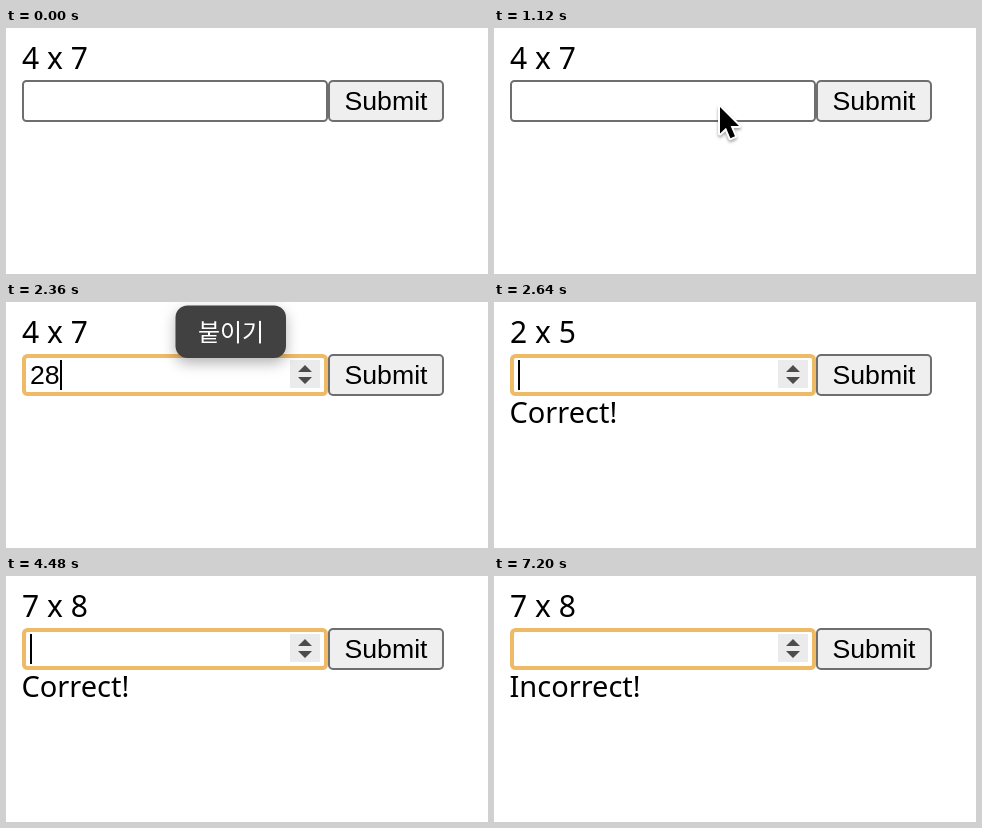
Recreate the animation shown at these times as an HTML page. Size 482 px wide and 246 px high, loop 7480 ms.

```html
<!DOCTYPE html>
<html lang="en">
<head>
<meta charset="utf-8">
<title>Times table quiz</title>
<style>
  html, body { margin: 0; width: 100%; height: 100%; overflow: hidden; background: #fff; }
  svg { display: block; width: 482px; height: 246px; }
  .prose { font-family: "Noto Sans", sans-serif; }
  .form { font: 26.67px "Liberation Sans", Arial, sans-serif; }
  .popup { font: 500 24px "Noto Sans CJK KR", "Noto Sans CJK", sans-serif; }
  #popup rect { filter: drop-shadow(0 5px 7px rgba(0, 0, 0, .3)); }
  #arrow { filter: drop-shadow(0 2px 1.5px rgba(0, 0, 0, .35)); }
</style>
</head>
<body>
<svg viewBox="0 0 482 246">
  <text id="question" class="prose" x="16" y="41" font-size="30"></text>

  <rect id="idle" x="17" y="53" width="304" height="40" rx="3.5" fill="#fff" stroke="#6e6e6e" stroke-width="2"/>
  <rect id="focus" x="18" y="54" width="302" height="38" rx="3.5" fill="#fff" stroke="#efba66" stroke-width="4"/>
  <g id="spinner">
    <path d="M284 58h30v28h-30z" fill="#ebebeb"/>
    <path d="M292 70l7-7 7 7zM292 75h14l-7 7z" fill="#4c4c4c"/>
  </g>
  <text id="answer" class="form" x="24" y="82"></text>
  <rect id="caret" y="58" width="2" height="30"/>

  <rect x="323" y="53" width="114" height="40" rx="4" fill="#efefef" stroke="#6e6e6e" stroke-width="2"/>
  <text class="form" x="380" y="82" text-anchor="middle">Submit</text>
  <text id="feedback" class="prose" x="15.5" y="121" font-size="29"></text>

  <g id="popup">
    <rect x="169.5" y="3.5" width="110.5" height="52.5" rx="12" fill="#414141"/>
    <text class="popup" x="225" y="39" text-anchor="middle" fill="#fff">붙이기</text>
  </g>

  <g id="pointer">
    <path id="arrow" d="M0 0v26.5l6-5.7 4.4 10.4 4.6-2-4.4-10.2h8.4z"
      stroke="#fff" stroke-width="4" paint-order="stroke" stroke-linejoin="round"/>
    <path id="beam" d="M-5-16q5 0 5 4v24q0 4-5 4M5-16q-5 0-5 4v24q0 4 5 4M-3 5h6"
      fill="none" stroke="#222" stroke-width="1.6"/>
  </g>
</svg>
<script>
const LOOP = 7480, TICK = 40;
const el = id => document.getElementById(id);
const show = (id, on) => el(id).style.opacity = +on;

// [time, value] steps, each held until the next
const questions = [[0, '4 x 7'], [2640, '2 x 5'], [4480, '7 x 8']];
const answers = [[0, ''], [2240, '2'], [2320, '28'], [2640, ''], [4120, '1'], [4200, '10'],
  [4480, ''], [5480, '5'], [5600, '54'], [5720, '']];
const feedbacks = [[0, ''], [2640, 'Correct!'], [5720, 'Incorrect!']];
const carets = [[0, 0], [1520, 1], [2040, 0], [2240, 1], [3120, 0], [3600, 1],
  [5000, 0], [5480, 1], [6200, 0], [6720, 1], [7200, 0]];
const pointers = [[0, ''], [680, 'arrow'], [1440, 'beam'], [2240, ''],
  [3120, 'beam'], [3200, 'arrow'], [4120, '']];

// [time, x, y] and [time, opacity], interpolated
const returnPath = [[3080, 226, 79], [3280, 257, 98], [3400, 249, 93.5], [3560, 249, 93.5], [3640, 250, 93]];
const popupFade = [[2240, 0], [2360, 1], [2520, 0]];

const held = (steps, t) => steps.filter(s => s[0] <= t).pop()[1];

function tween(keys, t) {
  const i = keys.findIndex(k => k[0] > t);
  if (i < 1) return keys.at(i).slice(1);
  const [a, b] = [keys[i - 1], keys[i]];
  const k = (t - a[0]) / (b[0] - a[0]);
  return a.slice(1).map((v, n) => v + (b[n + 1] - v) * k);
}

function pointerAt(t) {
  if (t >= 3080) return tween(returnPath, t);
  const k = Math.min(1, Math.max(0, (t - 640) / 480));
  const left = (1 - k) ** 2;
  return [226 + 256 * left, 79 + 36 * left];
}

function draw(t) {
  const answer = held(answers, t);
  el('question').textContent = held(questions, t);
  el('answer').textContent = answer;
  el('feedback').textContent = held(feedbacks, t);

  el('caret').setAttribute('x', 24 + Math.round(answer.length * 14.83));
  show('caret', held(carets, t));
  show('focus', t >= 1520);
  show('idle', t < 1520);
  show('spinner', t >= 1480);
  show('popup', tween(popupFade, t)[0]);

  const kind = held(pointers, t);
  el('pointer').setAttribute('transform', `translate(${pointerAt(t)})`);
  show('arrow', kind === 'arrow');
  show('beam', kind === 'beam');
}

const start = performance.now();
function loop() {
  const t = (performance.now() - start) % LOOP;
  draw(Math.floor(t / TICK) * TICK);
  requestAnimationFrame(loop);
}
loop();
</script>
</body>
</html>
```
